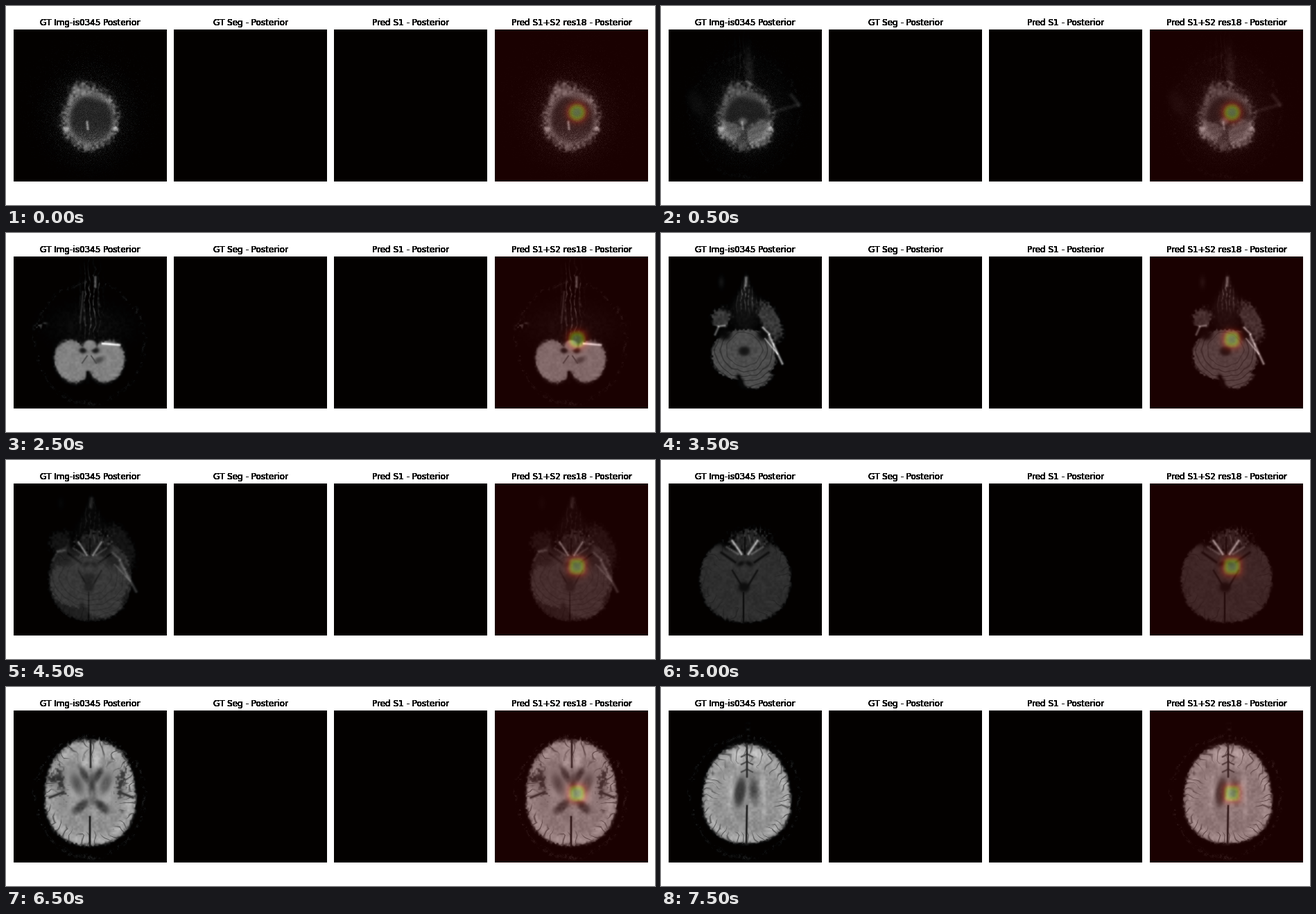
Write a matplotlib script that moves like this. It is 936 px wide and 288 px high and loops after 8000 ms.

```python
import numpy as np
import matplotlib.pyplot as plt
from matplotlib.animation import FuncAnimation

W, H, DPI = 936, 288, 72
SIZE_X, SIZE_Y, TOP = 221, 220, 34
LEFTS = (11, 242, 473, 705)
TITLES = ("GT Img-is0345 Posterior", "GT Seg - Posterior",
          "Pred S1 - Posterior", "Pred S1+S2 res18 - Posterior")
BLACK = np.array((3, 1, 0))
SIDES = (-1, 1)

rng = np.random.default_rng(345)
GX, GY = np.meshgrid(np.arange(SIZE_X) + 11.5, np.arange(SIZE_Y) + 34.5)


def noise(step):
    """Smooth noise in -1..1 with features about `step` pixels wide."""
    n = SIZE_X // step + 2
    grid = rng.uniform(-1, 1, (n, n))
    k = np.arange(n) * step
    rows = np.array([np.interp(np.arange(SIZE_X), k, r) for r in grid])
    return np.array([np.interp(np.arange(SIZE_Y), k, c) for c in rows.T]).T


FINE, MID, WIDE = noise(1), noise(3), noise(9)


def soft_step(d, soft):
    return 1 / (1 + np.exp(-np.clip(d / soft, -40, 40)))


class Slice:
    """Grey canvas in stage coordinates of the first panel."""

    def __init__(self, x, y):
        self.x, self.y = x, y
        self.g = np.zeros_like(x)

    def put(self, mask, v):
        self.g = self.g + mask * (v - self.g)

    def add(self, mask, v):
        self.g = self.g + mask * v

    def oval(self, cx, cy, rx, ry, tilt=0, soft=.8, rough=0):
        a = np.radians(tilt)
        dx, dy = self.x - cx, self.y - cy
        u = (dx * np.cos(a) + dy * np.sin(a)) / rx
        v = (dy * np.cos(a) - dx * np.sin(a)) / ry
        return soft_step((1 - np.hypot(u, v)) * min(rx, ry) + rough * MID, soft)

    def reach(self, cx, cy, rx, up, down, power=2):
        """Distance from the center; 1 on an egg-shaped outline."""
        dy = self.y - cy
        u, v = np.abs(self.x - cx) / rx, np.abs(dy) / np.where(dy < 0, up, down)
        return (u ** power + v ** power) ** (1 / power)

    def egg(self, *shape, soft=.9, rough=0):
        return soft_step((1 - self.reach(*shape)) * shape[2] + rough * MID, soft)

    def line(self, x0, y0, x1, y1, w):
        ux, uy = x1 - x0, y1 - y0
        t = ((self.x - x0) * ux + (self.y - y0) * uy) / (ux * ux + uy * uy)
        t = np.clip(t, 0, 1)
        d = np.hypot(self.x - x0 - t * ux, self.y - y0 - t * uy)
        return np.exp(-(d / w) ** 2)

    def skull(self, v):
        q = np.hypot((self.x - 121) / 79, (self.y - 159) / 87)
        band = np.exp(-((q - 1 + .04 * WIDE) / .03) ** 2)
        self.add(band * np.clip(MID + .4 * FINE, 0, 1), v)

    def wisps(self, mask, v, freq=.9):
        """Thin upright streaks."""
        s = np.clip(np.sin(freq * self.x + 2.5 * WIDE), 0, 1)
        self.add(mask * s * (.6 + .6 * MID), v)

    def folds(self, shape, count, v, depth=.22):
        """Winding dark folds that run inward from the outline."""
        q = self.reach(*shape)
        ang = np.arctan2(self.y - shape[1], self.x - shape[0])
        rim = soft_step(q - 1 + depth * (1 + .9 * WIDE), .04) * (q < 1.02)
        wave = np.sin(count / 2 * ang + 2.4 * WIDE + 4 * q)
        self.put(.7 * rim * np.exp(-(wave / .3) ** 2), v)

    def cortex(self, shape, count):
        q = self.reach(*shape)
        self.put(self.egg(*shape, rough=1.5), 148 + 13 * MID + 11 * WIDE)
        self.add(np.exp(-((q - .88) / .1) ** 2), 20)
        self.folds(shape, count, 62)


def ring_slice(s):
    s.add(s.oval(121, 160, 60, 66, soft=9) * np.clip(.55 + .8 * FINE, 0, 2), 17)
    s.add(np.clip(FINE - .8, 0, 1) * s.oval(121, 145, 95, 90, soft=12), 70)
    inner = s.egg(123, 165, 30, 36, 32, rough=2, soft=1.5)
    s.put(s.egg(121, 165, 41, 48, 43, rough=3, soft=2), 98 + 32 * MID + 14 * FINE)
    s.put(s.oval(107, 121, 13, 11, -15, 2, 3), 100 + 32 * MID)
    s.put(inner, 38 + 11 * FINE)
    s.add(inner * soft_step(s.y - 184, 4), 26 + 14 * FINE)
    s.add(s.line(100, 124, 150, 138, 5), 30)
    s.add(s.line(117, 168, 118, 178, 2), 95)
    for x, v in ((86, 85), (158, 125)):
        s.add(s.oval(x, 178, 4, 3), v)


def low_slice(s):
    s.put(s.oval(121, 140, 72, 78, soft=6), 8 + 5 * MID)
    s.put(s.oval(121, 146, 38, 22, soft=6), 22 + 6 * MID)
    s.skull(30)
    s.put(s.oval(51, 141, 10, 18, -25, 2), 33 + 5 * MID)
    s.wisps(s.oval(116, 84, 15, 32, soft=4), 42)
    s.put(s.oval(127, 90, 5, 24, -4, 1.5), 80 + 28 * MID)
    s.add(s.line(124, 109, 131, 114, 2), 145)
    s.add(s.line(163, 153, 197, 143, 3), 60 + 20 * MID)
    s.add(s.line(188, 129, 199, 143, 3), 75)
    s.put(s.oval(120, 184, 12, 13, soft=2), 58 + 14 * MID)
    shade = 178 + 14 * np.sin(.7 * s.y + .25 * s.x) + 14 * MID
    s.put(s.oval(99, 181, 18, 14, 10, 1.2, 2), shade)
    s.put(s.oval(143, 185, 18, 21, 28, 1.2, 2), shade + 8)
    s.put(s.oval(118, 167, 9, 7, soft=1.2), 45)
    s.put(s.oval(118, 167, 6, 5), 180 + 20 * MID)


def cerebellum_slice(s):
    s.put(s.oval(121, 135, 50, 26, soft=8), 11 + 6 * MID)
    s.skull(22)
    s.wisps(s.oval(122, 100, 13, 44, soft=3), 55)
    s.add(s.line(129, 64, 129, 78, 2), 75)
    s.add(s.line(111, 85, 107, 130, 1.5), 35)
    s.add(s.line(44, 138, 55, 131, 4) * np.clip(MID + .4, 0, 1), 50)
    shade = 132 + 8 * MID + 6 * WIDE
    s.put(s.oval(120, 180, 14, 20), shade)
    for k in SIDES:
        s.put(s.oval(120.5 + k * 25, 186, 25, 31, k * 18, 1, 1), shade)
    for k in SIDES:
        s.put(s.oval(120 + k * 9, 170, 5, 4, soft=1), 22)
        s.put(s.line(120 + k * 3, 178, 120 + k * 10, 188, 1.2), 80)
    s.put(s.oval(121, 162, 9, 7), shade)
    s.put(s.line(118, 202, 118, 216, 3), 5)
    s.put(s.oval(134, 184, 7, 4, -25, 1.2), 72)
    s.add(s.line(139, 160, 164, 162, 1.8), 115)


def ear_slice(s):
    s.put(s.oval(121, 118, 18, 24, soft=4), 16 + 5 * MID)
    s.add(s.oval(87, 71, 3, 6, soft=1.5), 22)
    nose = soft_step((s.y - 62) * .38 - np.abs(s.x - 123), 1.5)
    nose = nose * soft_step(108 - s.y, 5)
    s.put(nose, 24 + 8 * MID)
    s.wisps(nose, 48, 1.1)
    s.add(s.line(123, 65, 122, 76, 2.4), 85)
    s.put(s.oval(87, 122, 12, 14, 40, 1.2, 3), 55 + 16 * MID)
    s.put(s.oval(157, 127, 13, 29, -25, 1.2, 2), 58 + 14 * MID)
    body = np.maximum(s.egg(120, 178, 46, 38, 34, 2.3, rough=2),
                      s.oval(137, 208, 22, 16, -15, 1, 2))
    s.put(body, 78 + 8 * MID)
    rad = np.hypot(s.x - 120, (s.y - 168) * 1.05)
    arcs = np.clip(np.sin(.8 * rad + 2 * WIDE), 0, 1) ** 3
    s.put(body * arcs * soft_step(rad - 23, 3) * .5, 28)
    s.put(s.line(112, 208, 118, 222, 4), 6)
    s.put(s.oval(120, 171, 8, 6.5, soft=1.3), 20)
    for k in SIDES:
        s.put(s.oval(120 + k * 28, 147, 9, 8, soft=2), 7)
    s.add(s.line(78, 147, 83, 136, 1.8), 80)
    s.add(s.line(83, 135, 92, 134, 1.8), 80)
    s.add(s.line(147, 137, 156, 146, 1.8), 120)
    s.add(s.line(156, 148, 175, 189, 1.9), 135)
    s.add(s.line(150, 153, 168, 175, 1.4), 80)


def base_slice(s):
    shape = (121.5, 172, 65, 60, 63, 2.2)
    s.put(s.egg(*shape, rough=1.5), 47 + 5 * MID + 4 * WIDE)
    s.folds(shape, 26, 32)
    s.put(s.oval(121, 112, 40, 22, soft=1.5, rough=2), 0)
    s.put(s.oval(127, 118, 28, 16, soft=1.5, rough=6), 34 + 10 * MID)
    s.wisps(s.oval(134, 112, 22, 13, soft=3), 26, .8)
    for k in SIDES:
        s.put(s.line(121 + k * 34, 134, 121 + k * 14, 148, 2.2), 16)
        s.put(s.line(121 + k * 18, 160, 121 + k * 4, 183, 1.7), 20)
        s.put(s.oval(121 + k * 6, 150, 5, 3, k * 25, 1), 14)
        s.add(s.line(121 + k * 18, 117, 121 + k * 5, 136, 2), 125)
        s.add(s.line(121 + k * 26, 126, 121 + k * 10, 136, 2), 50)
    s.put(s.line(121, 112, 121, 136, 1.3), 12)
    s.put(s.oval(120, 184, 8, 7, soft=1.2), 14)
    s.put(s.line(119, 192, 119, 236, 1.3), 12)


def ventricle_slice(s):
    s.skull(32)
    s.cortex((121.5, 162, 65, 85, 67, 2.25), 30)
    s.put(s.line(122, 76, 122, 116, 1.5), 30)
    s.put(s.line(121, 188, 121, 231, 1.5), 20)
    for k in SIDES:
        x = 123
        s.add(s.oval(x + k * 8, 107, 5, 9, soft=2), 40)
        s.add(s.oval(x + k * 24, 155, 7, 12, k * 30, 3), 22)
        s.put(s.oval(x + k * 21, 140, 7, 14, k * 18, 2, 2), 85 + 14 * MID)
        s.put(s.oval(x + k * 10, 127, 4.5, 11, k * 28, 1.2), 60 + 10 * MID)
        s.put(s.oval(x + k * 15, 173, 13, 6, k * 42, 1.2), 62 + 10 * MID)
        s.put(s.oval(x + k * 43, 138, 5, 16, k * 8, 1.5, 5), 55)
        s.put(s.line(x + k * 60, 160, x + k * 40, 152, 2), 55)
    s.put(s.oval(69, 133, 8, 7, -30, 2, 4), 45)
    s.put(s.oval(124, 145, 4, 15, soft=1.5), 52)
    s.add(s.oval(124, 154, 2, 5), 45)


def upper_slice(s):
    s.skull(28)
    s.add(s.line(125, 54, 126, 78, 3) * np.clip(MID + .5, 0, 1), 26)
    s.cortex((123.5, 168, 63, 84, 58, 2.2), 36)
    for k in SIDES:
        s.add(s.line(124 + k * 22, 130, 124 + k * 26, 180, 4), 22)
        s.add(s.oval(124 + k * 12, 102, 9, 14, soft=3), 30)
        for y in (97, 108, 119):
            s.put(s.line(124, y, 124 + k * 8, y + 4, 1.3), 75)
    s.put(s.oval(114, 152, 7.5, 20, 8, 1.2, 1), 58 + 8 * MID)
    s.put(s.oval(134, 149, 6, 15, -4, 2), 66 + 8 * MID)
    s.put(s.line(124, 82, 124, 130, 1.5), 40)
    s.put(s.line(124, 172, 123, 228, 1.5), 25)


# step, painter, box (center, half size), heat (peak, radius, squareness)
FRONT = (121, 172, 48, 55)
KEYS = [
    (0, ring_slice, FRONT, (.95, 15, 2)),
    (3, low_slice, FRONT, (.95, 14, 2)),
    (5, cerebellum_slice, FRONT, (.95, 14.5, 2.3)),
    (7, ear_slice, FRONT, (.92, 14, 2.5)),
    (10, base_slice, (121, 172, 65, 62), (.95, 14.5, 3)),
    (13, ventricle_slice, (121, 153, 65, 75), (.95, 14, 2.8)),
    (15, upper_slice, (123, 157, 64, 70), (.95, 13.5, 3.5)),
]
HEAT_AT = (0, .3, .55, .75, 1)
HEAT_RGB = np.array([(26, 1, 1), (72, 14, 6), (96, 66, 8),
                     (86, 98, 18), (70, 84, 60)])


def paint(painter, own, box):
    x = own[0] + (GX - box[0]) * own[2] / box[2]
    y = own[1] + (GY - box[1]) * own[3] / box[3]
    s = Slice(x, y)
    painter(s)
    return np.clip(s.g, 0, 255)


def overlay(grey, peak, radius, power):
    dx, dy = np.abs(GX - 129.5) / radius, np.abs(GY - 154) / radius
    d = (dx ** power + dy ** power) ** (1 / power)
    h = peak * np.exp(-1.25 * d ** 2.4)
    heat = np.stack([np.interp(h, HEAT_AT, c) for c in HEAT_RGB.T], -1)
    rgb = ((.8 - .3 * h) * grey)[..., None] + heat
    return np.clip(rgb, 0, 255).astype(np.uint8)


def build(step):
    """Grey slice and heat overlay of one step."""
    a, b = next(p for p in zip(KEYS, KEYS[1:]) if step <= p[1][0])
    t = (step - a[0]) / (b[0] - a[0])

    def mix(p, q):
        return (1 - t) * np.array(p) + t * np.array(q)

    box = mix(a[2], b[2])
    grey = mix(paint(a[1], a[2], box), paint(b[1], b[2], box))
    rgb = np.maximum(grey[..., None], BLACK).astype(np.uint8)
    return rgb, overlay(grey, *mix(a[3], b[3]))


FRAMES = [build(i) for i in range(16)]

fig = plt.figure(figsize=(W / DPI, H / DPI), dpi=DPI, facecolor="white")
views = []
for left, title in zip(LEFTS, TITLES):
    ax = fig.add_axes([left / W, 1 - (TOP + SIZE_Y) / H,
                       SIZE_X / W, SIZE_Y / H])
    ax.axis("off")
    blank = np.full((SIZE_Y, SIZE_X, 3), BLACK, np.uint8)
    views.append(ax.imshow(blank, aspect="auto", interpolation="nearest"))
    # Stacked copies give the titles their heavy edges.
    for _ in range(14):
        fig.text((left + SIZE_X / 2) / W, 1 - 28 / H, title, fontsize=12,
                 family="DejaVu Sans", ha="center", va="baseline")


def update(i):
    scan, mapped = FRAMES[i]
    views[0].set_data(scan)
    views[3].set_data(mapped)
    return views


anim = FuncAnimation(fig, update, frames=16, interval=500, repeat=True,
                     repeat_delay=0, blit=False)
plt.show()
```
